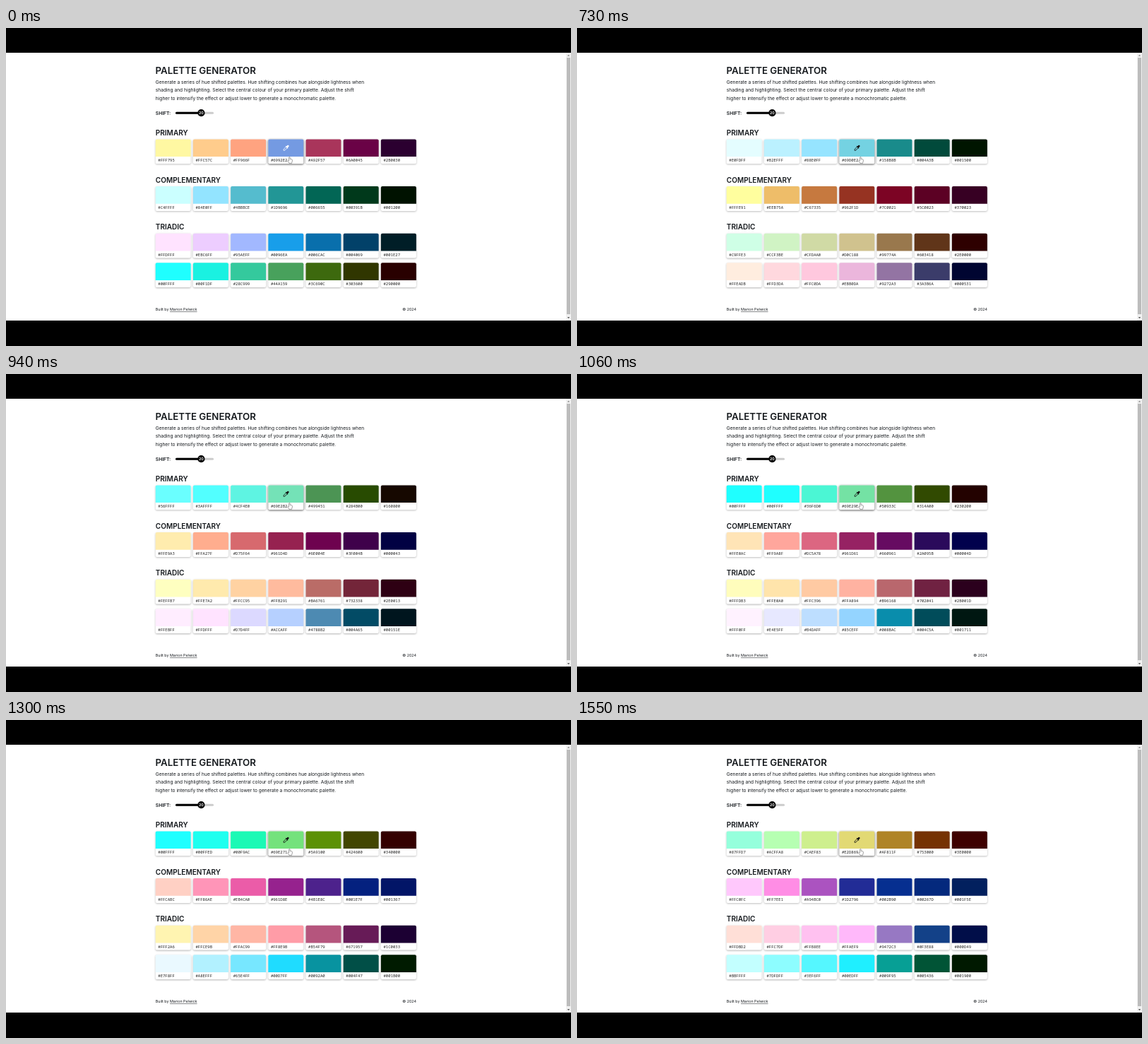
An HTML page with a canvas that plays this animation: 800 by 450 pixels, repeating every 1580 ms.

```html
<!DOCTYPE html>
<html lang="en">
<head>
<meta charset="utf-8">
<title>Palette generator</title>
<style>
  html, body { margin: 0; width: 100%; height: 100%; overflow: hidden; background: #000; }
  canvas { display: block; width: 800px; height: 450px; }
</style>
</head>
<body>
<canvas id="stage" width="800" height="450"></canvas>
<script>
const ctx = document.getElementById('stage').getContext('2d');
const LOOP = 1580, PICK = 640;
const SANS = 'Inter, sans-serif', MONO = '"Noto Sans Mono", monospace';
const INK = '#15191d';

// Picker hue over time, sampled at the moments the picture refreshes.
const HUES = [[640, 219.67], [790, 168.1], [1060, 146.28], [1300, 123.97], [1420, 110.08], [1550, 55.04]];
const TICKS = [640, 700, 730, 760, 790, 850, 880, 910, 940, 970, 1000, 1060, 1150,
  1180, 1210, 1240, 1270, 1300, 1330, 1360, 1420, 1450, 1480, 1550];

const ROWS = [157.4, 224.1, 290.8, 332.3];
const COL_X = 211.7, PITCH = 53.2, CARD_W = 50, FILL_H = 24.7, CARD_H = 34.8;

const lerp = (a, b, t) => a + (b - a) * t;

function hueAt(time) {
  const tick = TICKS.filter(t => t <= time).pop();
  const i = Math.max(1, HUES.findIndex(([t]) => t >= tick));
  const [t0, h0] = HUES[i - 1], [t1, h1] = HUES[i];
  return lerp(h0, h1, (tick - t0) / (t1 - t0));
}

// Fully determined by hue: the channels stay between 105 and 226.
function pickerColour(hue) {
  return [5, 3, 1].map(n => {
    const k = (n + hue / 60) % 6;
    return Math.round(226 - 121 * Math.max(0, Math.min(k, 4 - k, 1)));
  });
}

const toLinear = v => (v /= 255) <= 0.04045 ? v / 12.92 : ((v + 0.055) / 1.055) ** 2.4;
const toByte = v => {
  const s = v <= 0.0031308 ? 12.92 * v : 1.055 * v ** (1 / 2.4) - 0.055;
  return Math.round(255 * Math.min(1, Math.max(0, s)));
};
const labF = v => v > 0.008856 ? Math.cbrt(v) : 7.787037 * v + 4 / 29;
const labInv = v => v > 6 / 29 ? v ** 3 : (v - 4 / 29) / 7.787037;

function rgbToLch(rgb) {
  const [r, g, b] = rgb.map(toLinear);
  const x = labF((0.4124564 * r + 0.3575761 * g + 0.1804375 * b) / 0.95047);
  const y = labF(0.2126729 * r + 0.7151522 * g + 0.072175 * b);
  const z = labF((0.0193339 * r + 0.119192 * g + 0.9503041 * b) / 1.08883);
  const A = 500 * (x - y), B = 200 * (y - z);
  return { l: 116 * y - 16, c: Math.hypot(A, B), h: Math.atan2(B, A) * 180 / Math.PI };
}

function lchToRgb({ l, c, h }) {
  const a = h * Math.PI / 180, fy = (l + 16) / 116;
  const x = 0.95047 * labInv(fy + c * Math.cos(a) / 500);
  const y = labInv(fy);
  const z = 1.08883 * labInv(fy - c * Math.sin(a) / 200);
  return [
    3.2404542 * x - 1.5371385 * y - 0.4985314 * z,
    -0.969266 * x + 1.8760108 * y + 0.041556 * z,
    0.0556434 * x - 0.2040259 * y + 1.0572252 * z
  ].map(toByte);
}

const hex = rgb => '#' + rgb.map(v => v.toString(16).padStart(2, '0')).join('').toUpperCase();

// Bright saturated fills show slightly paler than their label says.
function soften(rgb) {
  const top = Math.max(...rgb), amount = 0.12 * (top / 255) ** 2;
  return rgb.map(v => Math.round(lerp(v, top, amount)));
}

// Seven swatches, light to dark, turning the hue 20 degrees per step.
function hueShift(base) {
  const { l, c, h } = rgbToLch(base);
  return [3, 2, 1, 0, -1, -2, -3].map(i => i === 0 ? base
    : lchToRgb({ l: lerp(l, i > 0 ? 99 : 1, Math.abs(i) / 3), c, h: h + 20 * i }));
}

function palettes(base) {
  const lch = rgbToLch(base);
  const turned = deg => lchToRgb({ ...lch, h: lch.h + deg });
  return [base, base.map(v => 255 - v), turned(240), turned(120)].map(hueShift);
}

function text(str, x, y, size, weight = 400, family = SANS, colour = INK, align = 'left') {
  ctx.font = `${weight} ${size}px ${family}`;
  ctx.fillStyle = colour;
  ctx.textAlign = align;
  ctx.fillText(str, x, y);
}

function box(x, y, w, h, colour, radii = 0) {
  ctx.fillStyle = colour;
  ctx.beginPath();
  ctx.roundRect(x, y, w, h, radii);
  ctx.fill();
}

function polygon(points, colour) {
  ctx.fillStyle = colour;
  ctx.beginPath();
  points.forEach(([x, y]) => ctx.lineTo(x, y));
  ctx.fill();
}

function card(x, y, rgb, active) {
  ctx.save();
  ctx.shadowColor = active ? 'rgba(0,0,0,.75)' : 'rgba(0,0,0,.3)';
  ctx.shadowBlur = active ? 3 : 2.5;
  ctx.shadowOffsetY = 0.8;
  box(x, y, CARD_W, CARD_H, '#fff', 2);
  ctx.restore();
  box(x, y, CARD_W, FILL_H, hex(soften(rgb)), [2, 2, 0, 0]);
  text(hex(rgb), x + 3.6, y + 32, 5.6, 400, MONO, '#222');
}

function eyedropper(x, y, colour) {
  ctx.save();
  ctx.translate(x, y);
  ctx.rotate(Math.PI / 4);
  box(-1.3, -5.2, 2.6, 4, colour, 1.2);
  box(-2.3, -2, 4.6, 1.1, colour, 0.4);
  ctx.strokeStyle = colour;
  ctx.lineWidth = 0.8;
  ctx.beginPath();
  ctx.moveTo(-1.1, -1);
  ctx.lineTo(-1.1, 3.4);
  ctx.lineTo(0, 4.9);
  ctx.lineTo(1.1, 3.4);
  ctx.lineTo(1.1, -1);
  ctx.stroke();
  ctx.restore();
}

function hand(x, y) {
  ctx.save();
  ctx.translate(x, y);
  ctx.beginPath();
  ctx.moveTo(-0.8, 5);
  ctx.lineTo(-0.8, 0.6);
  ctx.quadraticCurveTo(0, -0.6, 0.8, 0.6);
  ctx.lineTo(0.8, 3);
  ctx.lineTo(3.4, 3.6);
  ctx.quadraticCurveTo(4.2, 4, 4, 5.6);
  ctx.lineTo(3.2, 9);
  ctx.lineTo(-0.6, 9);
  ctx.lineTo(-2.7, 5.6);
  ctx.quadraticCurveTo(-2.3, 4.4, -0.8, 5.6);
  ctx.closePath();
  ctx.fillStyle = '#fff';
  ctx.strokeStyle = '#777';
  ctx.lineWidth = 0.7;
  ctx.fill();
  ctx.stroke();
  ctx.restore();
}

function page() {
  box(0, 0, 800, 450, '#000');
  box(0, 35, 800, 379, '#fff');
  box(793, 35, 7, 379, '#f1f1f1');
  box(794, 42, 5, 363, '#bcbcbc');
  polygon([[794.8, 39.8], [796.5, 37.8], [798.2, 39.8]], '#888');
  polygon([[794.8, 409], [796.5, 411], [798.2, 409]], '#555');

  text('PALETTE GENERATOR', 211.6, 65.4, 13.3, 600);
  ['Generate a series of hue shifted palettes. Hue shifting combines hue alongside lightness when',
    'shading and highlighting. Select the central colour of your primary palette. Adjust the shift',
    'higher to intensify the effect or adjust lower to generate a monochromatic palette.'
  ].forEach((line, i) => text(line, 211.8, 79.1 + 11.3 * i, 6.63));

  text('SHIFT:', 211.8, 122.6, 6.7, 600);
  box(240, 118.7, 54, 3, '#ccc', 1.5);
  box(240, 118.7, 36, 3, '#000', 1.5);
  box(271.3, 115.1, 10.2, 10.2, '#000', 5.1);
  text('20', 276.4, 122.2, 5.4, 600, SANS, '#fff', 'center');

  text('PRIMARY', 211.8, 151.9, 10.05, 600);
  text('COMPLEMENTARY', 211.8, 218.6, 10.05, 600);
  text('TRIADIC', 211.8, 285.2, 10.05, 600);

  text('Built by ', 211.8, 400.1, 5.35);
  const nameX = 211.8 + ctx.measureText('Built by ').width;
  text('Marion Pelwick', nameX, 400.1, 5.35);
  box(nameX, 400.9, ctx.measureText('Marion Pelwick').width, 0.5, INK);
  text('© 2024', 581, 400.1, 5.35, 400, SANS, INK, 'right');
}

function draw(time) {
  const waiting = time < PICK;
  const picked = pickerColour(hueAt(Math.max(time, PICK)));
  const grid = palettes(waiting ? pickerColour(0) : picked);
  grid[0][3] = picked;

  page();
  grid.forEach((row, r) => row.forEach((rgb, c) =>
    card(COL_X + PITCH * c, ROWS[r], rgb, r === 0 && c === 3)));
  const lightIcon = rgbToLch(picked).l < 65;
  eyedropper(396.5, 169.8, lightIcon ? '#fff' : '#111');
  hand(401.4, 182.3);
}

const start = performance.now();
function tick() {
  draw((performance.now() - start) % LOOP);
  requestAnimationFrame(tick);
}
tick();
</script>
</body>
</html>
```
